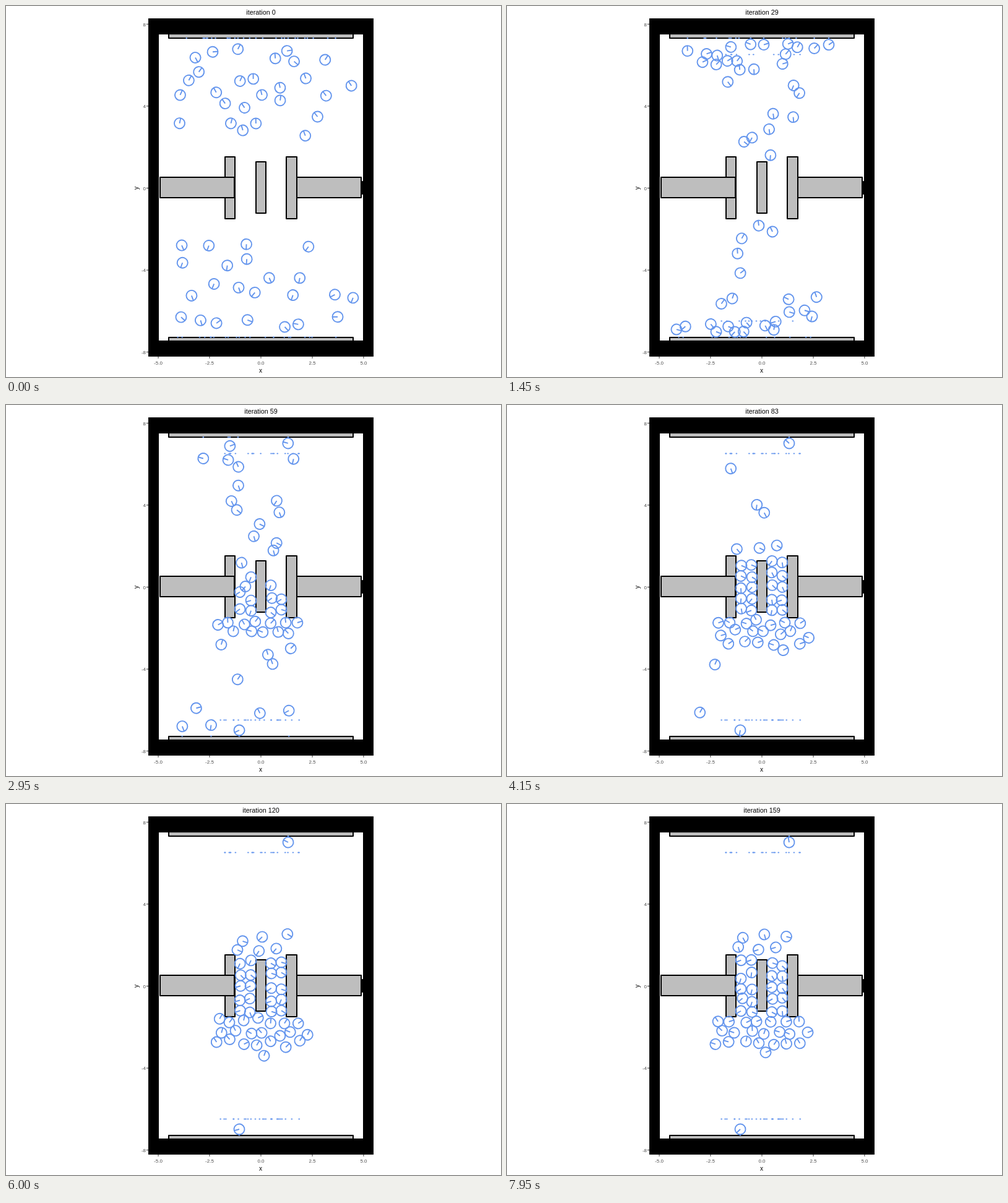
Animation of 800 by 600 pixels, one loop 8000 ms. Source, as an HTML page:

```html
<!DOCTYPE html>
<html lang="en">
<head>
<meta charset="utf-8">
<title>Crowd at a bottleneck</title>
<style>
  html, body { margin: 0; width: 100%; height: 100%; overflow: hidden; background: #fff; }
  svg { display: block; width: 800px; height: 600px; font-family: "Liberation Sans", Arial, sans-serif; }
</style>
</head>
<body>
<svg id="stage" viewBox="0 0 800 600"></svg>
<script>
const STEPS = 160, STEP_MS = 50, SPEED = 7, BODY = 17, BLUE = '#6495ed';

// Each group first visits its wall, then heads for a mark on the opposite side.
// `dir` points from the wall to the middle; the last walker stays at `lastX`.
const groups = [
  { size: 27, dir: 1, wall: 62, depth: 147, markY: 52, nextY: 509.5, lastX: 456, slot: upperSlot },
  { size: 23, dir: -1, wall: 526, depth: 144, markY: 535.5, nextY: 78.5, lastX: 377, slot: lowerSlot }
];
const blocks = [[354, 244, 16, 100], [404, 252, 16, 83], [453, 244, 17, 100]];
const laneX = [429, 379, 445, 395];

const stage = document.getElementById('stage');
function add(tag, attrs, text) {
  const el = document.createElementNS('http://www.w3.org/2000/svg', tag);
  for (const k in attrs) el.setAttribute(k, attrs[k]);
  if (text !== undefined) el.textContent = text;
  return stage.appendChild(el);
}
function box(x, y, width, height) {
  add('rect', {
    x, y, width, height, fill: '#bebebe', stroke: '#000', 'stroke-width': 2, 'stroke-linejoin': 'round'
  });
}
function label(x, y, text, size, anchor, fill, more) {
  return add('text', { x, y, 'font-size': size, 'text-anchor': anchor, fill, ...more }, text);
}
function dot(x, y) {
  return add('ellipse', { cx: x, cy: y, rx: 1.4, ry: 1.1, fill: BLUE });
}

function drawRoom() {
  box(263, 38, 298, 14);
  box(263, 536, 298, 14);
  box(576, 284, 4, 20);
  add('path', { d: 'M230 20H594V567H230ZM247 46V541H577V46Z', 'fill-rule': 'evenodd' });
  box(...blocks[0]);
  box(249, 277, 120, 33);
  box(...blocks[1]);
  box(470, 277, 104, 33);
  box(...blocks[2]);
  for (let k = -2; k <= 2; k++) {
    const x = 412 + 83 * k, y = 294.5 - 132.6 * k;
    add('path', { d: `M${x} 567v3M227 ${y}h3`, stroke: '#333' });
    label(x, 580, (2.5 * k).toFixed(1), 8, 'middle', '#4d4d4d');
    label(226, y + 3.2, 4 * k, 8, 'end', '#4d4d4d');
  }
  label(411.5, 593, 'x', 10, 'middle', '#000');
  label(0, 0, 'y', 10, 'middle', '#000', { transform: 'translate(214 294.5) rotate(-90)' });
}

let seed = 11;
function rand() {
  seed = (seed + 0x6d2b79f5) | 0;
  let t = Math.imul(seed ^ (seed >>> 15), seed | 1);
  t ^= t + Math.imul(t ^ (t >>> 7), t | 61);
  return ((t ^ (t >>> 14)) >>> 0) / 4294967296;
}
const jitter = size => (rand() - 0.5) * 2 * size;
const clamp = (v, lo, hi) => Math.min(hi, Math.max(lo, v));
const dist = (a, b) => Math.hypot(a.x - b.x, a.y - b.y);

// Rows of places filled from the middle outwards.
function fan(k, perRow, pitch, y, rowStep) {
  const row = Math.floor(k / perRow), c = k % perRow;
  const side = Math.ceil(c / 2) * (c % 2 ? 1 : -1);
  return {
    x: 411 + side * pitch + (row % 2 ? 6 : -5) + jitter(4),
    y: y + row * rowStep + jitter(4)
  };
}
function upperSlot(rank) {
  if (rank >= 20) return fan(rank - 20, 3, 33, 232, -18);
  return { x: laneX[rank % 4], y: 335 - 19.5 * Math.floor(rank / 4) + jitter(3) };
}
function lowerSlot(rank) {
  return fan(rank, 7, 22, 352, 18);
}

function scatter(g) {
  const spots = [];
  while (spots.length < g.size) {
    const p = { x: 257 + 306 * rand(), y: g.wall + g.dir * (4 + g.depth * rand()) };
    if (spots.every(q => dist(p, q) > 20)) spots.push(p);
  }
  return spots.sort((a, b) => (a.y - b.y) * g.dir);
}

function makeWalker(g, from, rank) {
  const last = rank === g.size - 1, t = rank / g.size;
  const markX = last ? g.lastX : clamp(from.x * 0.88 + 49 + jitter(30), 270, 550);
  return {
    ...from, g, markX,
    nextX: 346 + 131 * rand(),
    wall: { x: markX, y: g.wall + (last ? 0 : g.dir * 40 * rand() ** 1.5) },
    slot: g.slot(rank),
    leave: last ? Infinity : 4 + 62 * t + 40 * t ** 9,
    phase: 6.28 * rand(),
    leaving: false
  };
}

function aim(w, s) {
  if (!w.leaving) return w.wall;
  const x = w.slot.x + 2 * Math.sin(s * 0.07 + w.phase);
  const y = w.slot.y + 4 * Math.sin(s * 0.05 + 2 * w.phase);
  // Line up with the lane before entering it.
  const outside = w.g.dir > 0 && w.y < 237 && Math.abs(w.x - x) > 8;
  return { x, y: outside ? Math.min(y, 234) : y };
}

function walk(w, s) {
  if (s >= w.leave && dist(w, w.wall) < 30) w.leaving = true;
  const goal = aim(w, s), d = dist(w, goal) || 1, step = Math.min(SPEED, d / 2) / d;
  w.x += (goal.x - w.x) * step;
  w.y += (goal.y - w.y) * step;
}

function separate(crowd) {
  crowd.forEach((a, i) => {
    for (const b of crowd.slice(i + 1)) {
      const d = dist(a, b) || 1, push = (BODY - d) / 3 / d;
      if (push <= 0) continue;
      const dx = (b.x - a.x) * push, dy = (b.y - a.y) * push;
      a.x -= dx; a.y -= dy;
      b.x += dx; b.y += dy;
    }
  });
}

function keepInside(w) {
  for (const [x, y, width, height] of blocks) {
    const dx = w.x - x - width / 2, dy = w.y - y - height / 2;
    const ox = width / 2 + 8 - Math.abs(dx), oy = height / 2 + 8 - Math.abs(dy);
    if (ox <= 0 || oy <= 0) continue;
    if (ox < oy) w.x += Math.sign(dx) * ox;
    else w.y += Math.sign(dy) * oy;
  }
  w.x = clamp(w.x, 256, 568);
  w.y = clamp(w.y, 61, 527);
}

function heading(w, s) {
  const goal = aim(w, s), walking = dist(w, goal) > 12;
  const ahead = (w.leaving ? 1 : -1) * w.g.dir * Math.PI / 2;
  const base = walking ? Math.atan2(goal.y - w.y, goal.x - w.x) : ahead;
  return base + (walking ? 0.4 : 1.3) * Math.sin(7 * w.phase + s * 0.3);
}

function simulate(crowd) {
  const poses = [];
  for (let s = 0; s < STEPS; s++) {
    if (s) {
      crowd.forEach(w => walk(w, s));
      separate(crowd);
      crowd.forEach(keepInside);
    }
    poses.push(crowd.map(w => ({ x: w.x, y: w.y, a: heading(w, s), leaving: w.leaving })));
  }
  return poses;
}

drawRoom();
const title = label(412, 14, '', 10.8, 'middle', '#000');
const crowd = groups.flatMap(g => scatter(g).map((p, rank) => makeWalker(g, p, rank)));
const parts = crowd.map(w => ({
  mark: dot(w.markX, w.g.markY),
  next: dot(w.nextX, w.g.nextY),
  body: add('path', {
    d: 'M-8.5 0a8.5 8.5 0 1 0 17 0a8.5 8.5 0 1 0-17 0M0 0H8', fill: 'none', stroke: BLUE, 'stroke-width': 1.9
  })
}));
const poses = simulate(crowd);

const show = (el, on) => el.setAttribute('visibility', on ? 'visible' : 'hidden');
function render(s) {
  title.textContent = `iteration ${s}`;
  poses[s].forEach((p, i) => {
    const { mark, next, body } = parts[i];
    show(mark, !p.leaving);
    show(next, p.leaving);
    body.setAttribute('transform',
      `translate(${p.x.toFixed(2)} ${p.y.toFixed(2)}) rotate(${(p.a * 180 / Math.PI).toFixed(1)})`);
  });
}

const begin = performance.now();
function tick() {
  render(Math.floor((performance.now() - begin) / STEP_MS) % STEPS);
  requestAnimationFrame(tick);
}
render(0);
requestAnimationFrame(tick);
</script>
</body>
</html>
```
